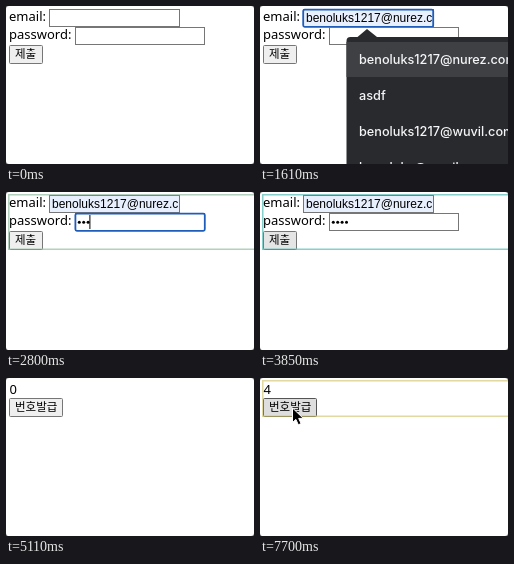
Animation, 248 px wide and 158 px high, one loop 8 s. Source, as an HTML page:

```html
<!DOCTYPE html>
<html lang="ko">
<head>
<meta charset="utf-8">
<title>Login form and number button</title>
<style>
  html, body { margin: 0; width: 100%; height: 100%; overflow: hidden; background: #555; }
  svg { display: block; width: 248px; height: 158px; }
  text { white-space: pre; }
  .label { font: 13px "Noto Sans", sans-serif; }
  .button rect { fill: #efefef; stroke: #767676; }
  .button.hover rect { fill: #e5e5e5; }
  .button.pressed rect { fill: #dedede; stroke: #555; }
  .button text { font: 11.5px "Noto Sans CJK KR", "Noto Sans CJK", sans-serif; }
  .field { fill: #fff; stroke: #767676; }
  .filled { fill: #e8f0fe; }
  .ring { fill: none; stroke: #1f5dba; stroke-width: 1.8; }
  .value { font: 12px "Liberation Sans", Arial, sans-serif; }
  .menu { fill: #292a2d; }
  .menu text { font: 500 12.7px Inter, sans-serif; fill: #f4f5f6; }
  .outline { fill: none; stroke-width: 1.5; opacity: .6; }
</style>
</head>
<body>
<svg viewBox="0 0 248 158">
  <defs>
    <clipPath id="emailClip"><rect x="45" y="4" width="127" height="17"/></clipPath>
  </defs>
  <rect width="248" height="158" rx="3" fill="#fff"/>

  <g data-on="0-5040">
    <text class="label" x="3" y="15">email:</text>
    <text class="label" x="3" y="33">password:</text>
    <rect class="field" x="43.5" y="3.5" width="130" height="17"/>
    <rect class="field filled" x="43.5" y="3.5" width="130" height="17" data-on="1400-5040"/>
    <rect class="ring" x="43.2" y="3.6" width="130" height="17.2" rx="1.5" data-on="1050-2240"/>
    <text class="value" x="46" y="16" clip-path="url(#emailClip)" data-on="1400-5040">benoluks1217@nurez.com</text>
    <rect x="46" y="5" width="1" height="14" data-on="1050-1610"/>

    <rect class="field" x="69.5" y="21.5" width="129" height="17"/>
    <rect class="ring" x="69.4" y="21.6" width="129.4" height="17.2" rx="1.5" data-on="2240-3710"/>
    <g id="dots"></g>
    <rect id="caret" y="23" width="1" height="14" data-on="2240-3360"/>

    <g class="button" data-hover="3360-3570 3710-4480" data-pressed="3570-3710">
      <rect x="3.5" y="39.5" width="33" height="18" rx="1"/>
      <text x="9" y="52">제출</text>
    </g>

    <g class="menu" data-on="1190-1750">
      <path d="M86.5 35q0-4 4-4h7l9.5-8 10 8H260V170H86.5z"/>
      <rect x="86.5" y="36" width="170" height="35" fill="#3f4044" data-on="1400-1750"/>
      <g id="suggestions"></g>
    </g>
  </g>

  <g data-on="5040-8000">
    <text class="label" id="number" x="3.5" y="15.5"></text>
    <g class="button" data-hover="6020-6230 7070-8000" data-pressed="7630-8000">
      <rect x="3.5" y="20.5" width="53" height="18" rx="1"/>
      <text x="9" y="33">번호발급</text>
    </g>
  </g>

  <rect class="outline" id="outline" x="2.75" y="2.75" width="260"/>
  <path id="cursor" d="M0 0V14.5l3.4-3.1 2.4 5.4 2.8-1.2-2.4-5.2h4.6z" stroke="#fff" stroke-width="1"
        data-on="4200-4270 7140-8000"/>
</svg>
<script>
  const LOOP = 8000;
  const byId = id => document.getElementById(id);

  byId('suggestions').innerHTML =
    ['benoluks1217@nurez.com', 'asdf', 'benoluks1217@wuvil.com', 'benoluks@wuvil.com']
      .map((item, i) => `<text x="99" y="${57.5 + 36 * i}">${item}</text>`).join('');

  const keyTimes = [2590, 2660, 2800, 3010];
  byId('dots').innerHTML = keyTimes
    .map((time, i) => `<circle cx="${73.3 + 4.4 * i}" cy="30.2" r="1.5" data-on="${time}-5040"/>`).join('');

  // Render highlights: [start, colour], an empty colour hides the outline
  const highlights = [
    [0, ''], [1750, '#37afa9'], [2030, '#63b19e'], [2100, ''],
    [2590, '#63b19e'], [2660, '#80b393'], [3570, '#97b488'], [3640, ''],
    [3850, '#37afa9'], [4060, ''], [4200, '#37afa9'], [4480, ''],
    [6230, '#37afa9'], [6650, '#63b19e'], [6720, '#abb67d'], [6790, '#cfc065']
  ];
  const numbers = [[0, 0], [6230, 7], [6650, 10], [7070, 8], [7630, 4]];

  const parseSpans = text => text.split(' ').map(span => span.split('-').map(Number));
  const inSpans = (spans, t) => spans.some(([from, to]) => t >= from && t < to);
  const latest = (steps, t) => steps.filter(([start]) => start <= t).pop()[1];

  const timed = ['on', 'hover', 'pressed'].flatMap(kind =>
    [...document.querySelectorAll(`[data-${kind}]`)].map(el => ({
      el, kind, spans: parseSpans(el.dataset[kind])
    })));

  function draw(t) {
    for (const { el, kind, spans } of timed) {
      const active = inSpans(spans, t);
      if (kind === 'on') el.style.display = active ? '' : 'none';
      else el.classList.toggle(kind, active);
    }
    const typed = keyTimes.filter(time => time <= t).length;
    byId('caret').setAttribute('x', typed ? 70.5 + 4.3 * typed : 72);

    const outline = byId('outline');
    outline.style.stroke = latest(highlights, t) || 'none';
    outline.setAttribute('height', t < 5040 ? 54.5 : 35.5);

    byId('number').textContent = latest(numbers, t);
    byId('cursor').setAttribute('transform', t < 5040 ? 'translate(26 48)' : 'translate(32.5 30)');
  }

  const start = performance.now();
  function tick() {
    draw((performance.now() - start) % LOOP);
    requestAnimationFrame(tick);
  }
  tick();
</script>
</body>
</html>
```
